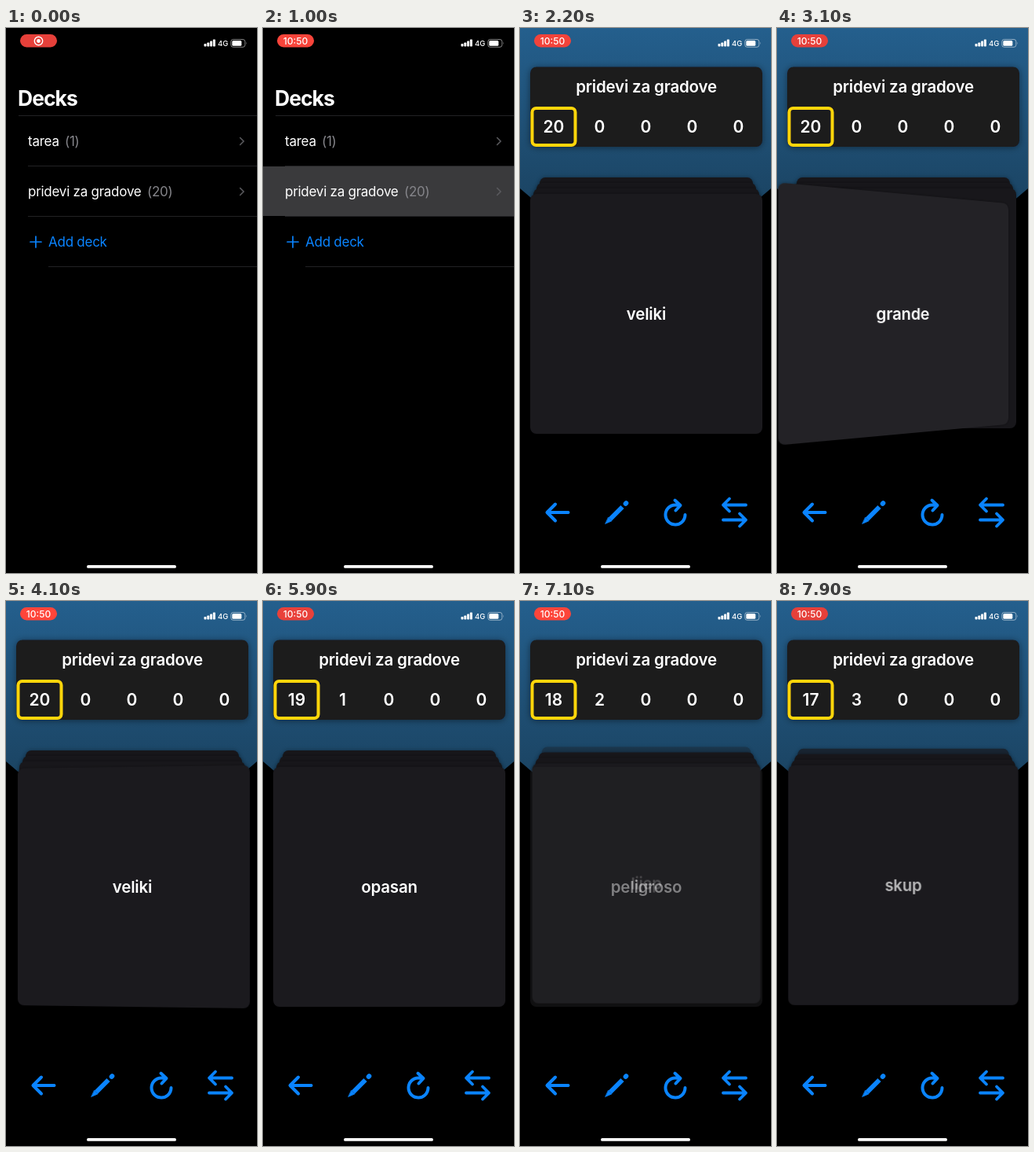
Write an HTML page that moves like this. It is 320x693 px and loops after 8000 ms.

```html
<!DOCTYPE html>
<html lang="en">
<head>
<meta charset="utf-8">
<title>Decks</title>
<style>
  html, body { margin: 0; width: 100%; height: 100%; overflow: hidden; background: #000; }
  body { position: relative; font-family: Inter, "Liberation Sans", sans-serif; }
  svg, .page, .card { position: absolute; }
  svg { left: 0; top: 0; width: 320px; height: 693px; overflow: visible; }
  .page { left: 0; top: 0; width: 320px; height: 693px; overflow: hidden; }
  #list text { font-size: 17px; letter-spacing: -.25px; fill: #fff; }
  #list .title { font-size: 26.5px; font-weight: 700; letter-spacing: -1px; }
  #list .count { fill: #85858a; }
  #list .add { fill: #0a84ff; }
  .bold { font-size: 20.5px; font-weight: 600; letter-spacing: -.2px; fill: #fff; text-anchor: middle; }
  .num { font-size: 21px; letter-spacing: 0; }
  .icons { fill: none; stroke: #0a84ff; stroke-width: 4; stroke-linecap: round; stroke-linejoin: round; }
  .card {
    left: 13px; top: 211px; width: 296px; height: 304.5px; border-radius: 8px;
    background: #18171b; box-shadow: 0 0 5px rgba(0, 0, 0, .35);
    display: flex; align-items: center; justify-content: center;
  }
  .card span { color: #fff; font-size: 20.5px; font-weight: 600; letter-spacing: -.2px; padding-top: 1px; }
</style>
</head>
<body>
<div class="page" id="list">
  <svg viewBox="0 0 320 693">
    <rect id="tapped" x="0" y="176" width="320" height="63" fill="#3a3a3c"/>
    <g stroke="#222224">
      <path d="M16 111.5H320M28 175.5H320M28 239.5H320M54 303.5H320"/>
    </g>
    <text class="title" x="15" y="99">Decks</text>
    <text x="28" y="150">tarea</text>
    <text class="count" x="75" y="150">(1)</text>
    <text x="28" y="214">pridevi za gradove</text>
    <text class="count" x="180" y="214">(20)</text>
    <text class="add" x="54" y="278">Add deck</text>
    <path d="M31 272H45M38 265V279" stroke="#0a84ff" stroke-width="1.7" stroke-linecap="round"/>
    <path d="M298.5 139.5l4.5 4.5-4.5 4.5M298.5 203.5l4.5 4.5-4.5 4.5" fill="none" stroke="#5a5a5e" stroke-width="1.5" stroke-linecap="round"/>
  </svg>
</div>

<div class="page" id="deck" style="background:#000">
  <svg viewBox="0 0 320 693">
    <defs>
      <linearGradient id="sky" gradientUnits="userSpaceOnUse" x1="0" y1="0" x2="0" y2="220">
        <stop offset="0" stop-color="#245f8d"/>
        <stop offset="1" stop-color="#1b4463"/>
      </linearGradient>
      <filter id="soft" x="-10%" y="-20%" width="120%" height="140%">
        <feDropShadow dx="0" dy="1" stdDeviation="4" flood-opacity=".45"/>
      </filter>
    </defs>
    <path d="M0 0H320V204L160 340L0 204Z" fill="url(#sky)"/>
    <rect x="13" y="49.5" width="296" height="101.5" rx="8" fill="#1b1a1e" filter="url(#soft)"/>
    <text class="bold" x="161" y="82">pridevi za gradove</text>
    <g id="counts"></g>
    <rect x="15.5" y="102" width="55" height="47" rx="5" fill="none" stroke="#ffd60a" stroke-width="4"/>
    <g class="icons">
      <path d="M61.500 616H35M45 605.500L34.500 616L45 626.500"/>
      <path d="M130.500 609L115 624.500" stroke-width="6" stroke-linecap="butt"/>
      <path d="M112.700 622.500L117 626.800L109 630.300Z" fill="#0a84ff" stroke-width=".8"/>
      <path d="M134.700 604.800L135.300 604.200" stroke-width="6"/>
      <path d="M210.500 619A12.500 12.500 0 1 1 203 607.500M197.500 600.500L204.500 607L198.500 613.500"/>
      <path d="M288 606.500H260M267 598.500L259 606.500L267 614.500M259 625.500H287M280 617.500L288 625.500L280 633.500" stroke-width="3.800"/>
    </g>
  </svg>
  <div id="stack"></div>
</div>

<svg viewBox="0 0 320 693">
  <rect id="pill" x="18" y="8" width="47" height="16.500" rx="8.250"/>
  <g id="rec">
    <circle cx="41.500" cy="16.500" r="5.200" fill="none" stroke="#fff" stroke-width="1.400"/>
    <circle cx="41.500" cy="16.500" r="2.400" fill="#fff"/>
  </g>
  <text id="clock" x="41.500" y="20.700" font-size="12" font-weight="500" text-anchor="middle" fill="#fff">10:50</text>
  <g fill="#fff">
    <rect x="252.500" y="20" width="3" height="3.500" rx=".8"/>
    <rect x="256.300" y="18.500" width="3" height="5" rx=".8"/>
    <rect x="260.100" y="16.500" width="3" height="7" rx=".8"/>
    <rect x="263.900" y="14.500" width="3" height="9" rx=".8"/>
    <text x="270" y="22.800" font-size="9.500" font-weight="500">4G</text>
    <rect x="288.300" y="16" width="12" height="6.800" rx="1.500"/>
    <path d="M306 17.800q1.300 1.500 0 3.200z" opacity=".5"/>
    <rect x="103" y="683" width="114" height="3.800" rx="1.900"/>
  </g>
  <rect x="286.800" y="14.500" width="18" height="9.800" rx="2.800" fill="none" stroke="#fff" stroke-opacity=".5"/>
</svg>

<script>
  const LOOP = 8000, LAYERS = 4;
  const $ = id => document.getElementById(id);
  const clamp = x => Math.max(0, Math.min(1, x));
  const ramp = (t, from, to) => clamp((t - from) / (to - from));

  // Critically damped spring, 0 to 1; rate per second
  const spring = (ms, rate) => {
    const u = Math.max(0, ms) * rate / 1000;
    return 1 - (1 + u) * Math.exp(-u);
  };

  // start: when the card reaches the front; tilt: turn of the card it replaces
  const cards = [
    { start: -5000, front: 'veliki', back: 'grande', flips: [2893, 3790], tilt: 0 },
    { start: 4990, front: 'opasan', back: 'peligroso', flips: [6090], tilt: -2.5 },
    { start: 6990, front: 'lijep', back: '', flips: [], tilt: 0 },
    { start: 7690, front: 'skup', back: '', flips: [], tilt: -20 }
  ];

  const counts = [43, 101.5, 160.5, 219.5, 278.5].map(x => {
    const el = document.createElementNS('http://www.w3.org/2000/svg', 'text');
    el.setAttribute('class', 'bold num');
    el.setAttribute('x', x);
    el.setAttribute('y', 133);
    el.textContent = '0';
    $('counts').append(el);
    return el;
  });

  function addCard() {
    const el = document.createElement('div');
    el.className = 'card';
    const label = document.createElement('span');
    el.append(label);
    $('stack').append(el);
    return { el, label };
  }

  const layers = Array.from({ length: LAYERS }, addCard).reverse();
  const leaving = addCard();

  function angleOf(card, t) {
    return card.flips.reduce((a, at, i) => {
      if (t < at) return a;
      const p = spring(t - at, 22);
      return 180 * (i % 2 ? 1 - p : p);
    }, 0);
  }

  function showFace(view, card, t, tilt, depth) {
    const a = angleOf(card, t), isBack = a > 90;
    const turn = (isBack ? 180 - a : -a) + tilt;
    view.label.textContent = isBack ? card.back : card.front;
    view.el.style.background = isBack ? '#232226' : '#1b1a1e';
    place(view, depth, ` perspective(304px) rotateY(${turn}deg)`);
  }

  function place(view, depth, extra = '') {
    view.el.style.transform = `translateY(${-7 * depth}px) scaleX(${1 - .027 * depth})${extra}`;
  }

  function drawStack(t) {
    const n = cards.filter(c => t >= c.start).length - 1;
    const card = cards[n], age = t - card.start;
    const p = spring(age, 11.4);

    layers.forEach((view, k) => {
      const depth = k + 1 - p;
      if (k === 0) showFace(view, card, t, 0, depth);
      else place(view, depth);
    });
    layers[0].label.style.opacity = p;
    layers[LAYERS - 1].el.style.opacity = p;

    const fade = n ? 1 - ramp(age, 0, 200) : 0;
    leaving.el.style.opacity = fade;
    if (fade) showFace(leaving, cards[n - 1], t, card.tilt * ramp(age, 0, 110), 0);

    counts[0].textContent = 20 - n;
    counts[1].textContent = n;
  }

  function drawStatus(t) {
    const toClock = ramp(t, 50, 600);
    $('rec').style.opacity = 1 - toClock;
    $('clock').style.opacity = toClock;
    const phase = t % 2600;
    const glow = ramp(phase, 650, 1150) - ramp(phase, 1850, 2600);
    const mix = (a, b) => Math.round(a + (b - a) * glow);
    $('pill').style.fill = `rgb(${mix(230, 255)}, ${mix(64, 69)}, 58)`;
  }

  function draw(t) {
    const push = spring(t - 1006, 18.26);
    $('tapped').style.opacity = t >= 1000 ? 1 : 0;
    $('list').style.transform = `translateX(${-96 * push}px)`;
    $('list').style.opacity = 1 - .1 * push;
    $('deck').style.transform = `translateX(${320 * (1 - push)}px)`;
    drawStack(t);
    drawStatus(t);
  }

  const begin = performance.now();
  function tick() {
    draw((performance.now() - begin) % LOOP);
    requestAnimationFrame(tick);
  }
  tick();
</script>
</body>
</html>
```
